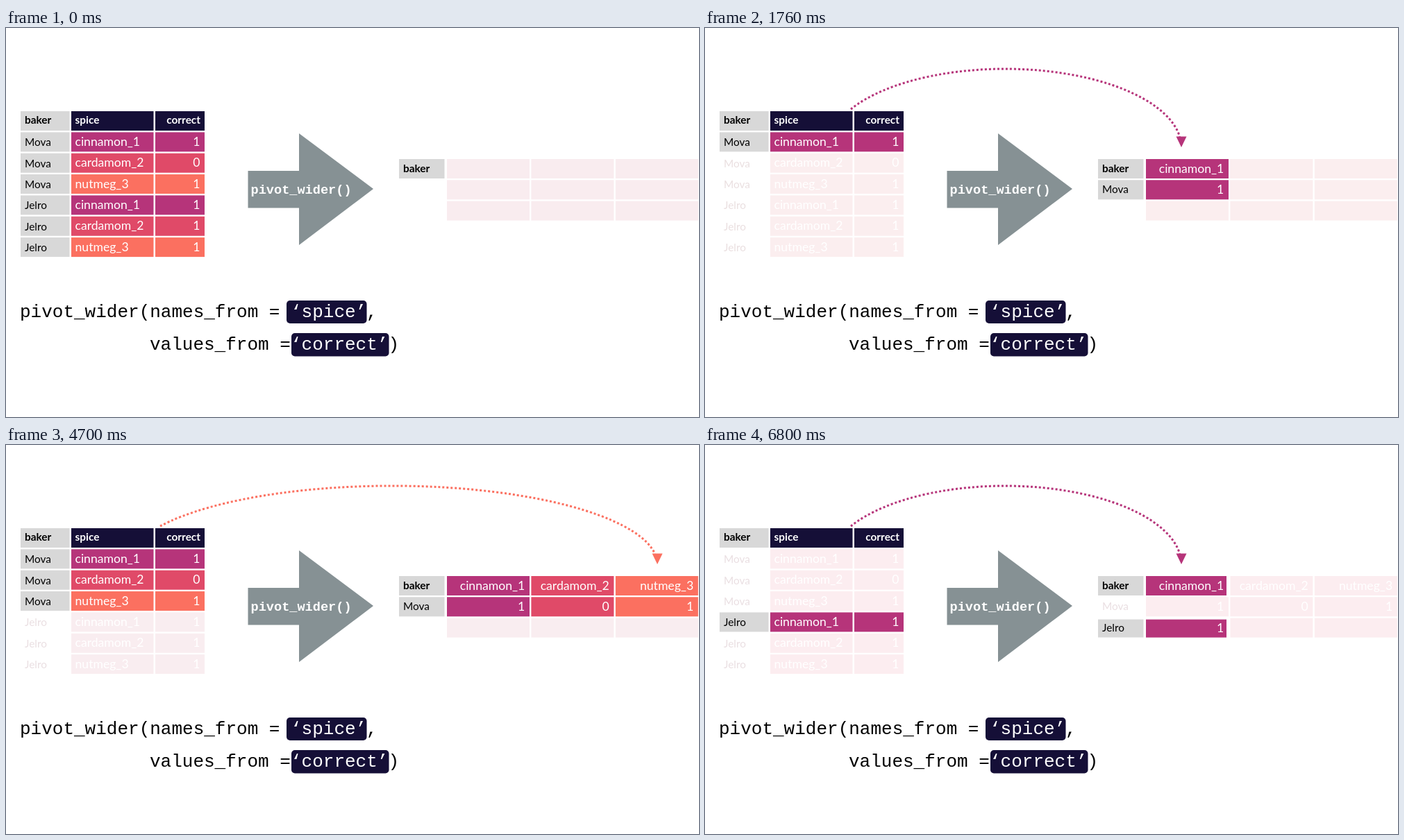
Animation, 998 px wide and 561 px high, one loop 8000 ms. Source, as an HTML page:

```html
<!DOCTYPE html>
<html lang="en">
<head>
<meta charset="utf-8">
<title>Pivot wider</title>
<style>
  html, body { margin: 0; width: 100%; height: 100%; overflow: hidden; background: #fff; }
  svg { display: block; }
  text { font-family: Lato, sans-serif; white-space: pre; }
  .cell { font-size: 17.6px; }
  .name { font-size: 15.4px; }
  .head { font-size: 15.4px; font-weight: bold; }
  .code { font: 26px "Liberation Mono", monospace; }
  .call { font: bold 18.6px "Liberation Mono", monospace; }
</style>
</head>
<body>
<svg id="stage" width="998" height="561" viewBox="0 0 998 561"></svg>
<script>
const NAVY = '#150f37', GREY = '#d8d8d8', WHITE = '#fff', BLACK = '#000';
const COLORS = ['#b6347a', '#e04a68', '#fb7060'];
const SPICES = ['cinnamon_1', 'cardamom_2', 'nutmeg_3'];
const BAKERS = ['Mova', 'Jelro'];
const CORRECT = [1, 0, 1, 1, 1, 1];
const LOOP = 8000, STEP = 30.35;

// rows: highlighted input rows [first, last]; pale: faded fill per spice; dim: faded name
const same = c => [c, c, c];
const SCENES = [
  { at: 0, rows: [0, 5], pale: same('#f9ecef'), dim: BLACK },
  { at: 500, rows: [0, 0], pale: same('#fbeeef'), dim: '#eadfe0', arc: 0 },
  { at: 2600, rows: [0, 1], pale: ['#f9ebf2', '#f9ebf2', '#fff0ee'], dim: '#e6e6e6', arc: 1 },
  { at: 4700, rows: [0, 2], pale: same('#f9edf0'), dim: '#eadfe2', arc: 2 },
  { at: 6800, rows: [3, 3], pale: same('#fcedf0'), dim: '#eadfe2', arc: 0 }
];
const ARCS = [
  { x: 210, tip: 686, rx: 254 },
  { x: 215, tip: 809, rx: 316 },
  { x: 222, tip: 938, rx: 382 }
];

const rect = (x, y, w, h, fill, r = 0) =>
  `<rect x="${x}" y="${y}" width="${w}" height="${h}" rx="${r}" fill="${fill}"/>`;
const text = (s, x, y, style, fill, anchor = 'start') =>
  `<text x="${x}" y="${y}" class="${style}" fill="${fill}" text-anchor="${anchor}">${s}</text>`;

function inputTable({ rows, pale, dim }) {
  let out = rect(21, 120, 70.5, 28, GREY) + rect(94, 120, 118.5, 28, NAVY) + rect(215, 120, 71, 28, NAVY)
    + text('baker', 27, 138, 'head', BLACK) + text('spice', 99.5, 138, 'head', WHITE)
    + text('correct', 280, 138, 'head', WHITE, 'end');
  CORRECT.forEach((value, i) => {
    const y = 120 + STEP * (i + 1), k = i % 3;
    const on = i >= rows[0] && i <= rows[1];
    const fill = on ? COLORS[k] : pale[k];
    if (on) out += rect(21, y, 70.5, 28, GREY);
    out += rect(94, y, 118.5, 28, fill) + rect(215, y, 71, 28, fill)
      + text(BAKERS[i / 3 | 0], 27, y + 20, 'name', on ? BLACK : dim)
      + text(SPICES[k], 99.5, y + 19.6, 'cell', WHITE)
      + text(value, 279.5, y + 19.6, 'cell', WHITE, 'end');
  });
  return out;
}

function outputTable(scene, n) {
  const last = n === 4;
  let out = rect(566, 189, 65.5, 28, GREY) + text('baker', 572, 207.5, 'head', BLACK);
  if (n) {
    if (!last) out += rect(566, 219.3, 65.5, 28, GREY);
    out += text(BAKERS[0], 572, 238, 'name', last ? scene.dim : BLACK);
  }
  if (last) out += rect(566, 251.5, 65.5, 26, GREY) + text(BAKERS[1], 572, 268.5, 'name', BLACK);
  for (let row = 0; row < 3; row++) for (let k = 0; k < 3; k++) {
    const on = last ? k === 0 && row !== 1 : row < 2 && k < n;
    const x = 635 + 121.4 * k, y = 189 + 30.3 * row;
    const cut = last && row === 2 && on ? 2 : 0;
    out += rect(x, y + cut, last && on ? 116 : 119, 28 - cut, on ? COLORS[k] : scene.pale[k]);
    if (on || last && row < 2)
      out += text(row ? CORRECT[k] : SPICES[k], x + 112.3, y + 20, 'cell', WHITE, 'end');
  }
  return out;
}

function arc(k) {
  const { x, tip, rx } = ARCS[k], c = COLORS[k];
  return `<path d="M${x} 117A${rx} 113 0 0 1 ${tip - rx * .009} 157" fill="none" stroke="${c}"
      stroke-width="3" stroke-dasharray="3"/>
    <path d="M${tip - 7.5} 156.5h15l-7.5 15.5z" fill="${c}"/>`;
}

const FIXED = `<path d="M348.5 206H422V152L529 232 422 313V259.5H348.5z" fill="#869194"/>`
  + text('pivot_wider()', 352.5, 239, 'call', WHITE)
  + rect(404, 393, 115.5, 33, NAVY, 5) + rect(411, 440, 140.5, 33.5, NAVY, 5)
  + text('pivot_wider(names_from =', 20, 417, 'code', BLACK)
  + text('‘spice’', 410, 417, 'code', WHITE) + text(',', 519, 417, 'code', BLACK)
  + text('values_from =', 207, 464, 'code', BLACK)
  + text('‘correct’', 410, 464, 'code', WHITE) + text(')', 550.5, 464, 'code', BLACK);

const stage = document.getElementById('stage');
const start = performance.now();
let shown = -1;

function draw() {
  const t = (performance.now() - start) % LOOP;
  const n = SCENES.findLastIndex(s => s.at <= t);
  if (n !== shown) {
    const scene = SCENES[n];
    stage.innerHTML = inputTable(scene) + outputTable(scene, n) + FIXED + (n ? arc(scene.arc) : '');
    shown = n;
  }
  requestAnimationFrame(draw);
}
draw();
</script>
</body>
</html>
```
